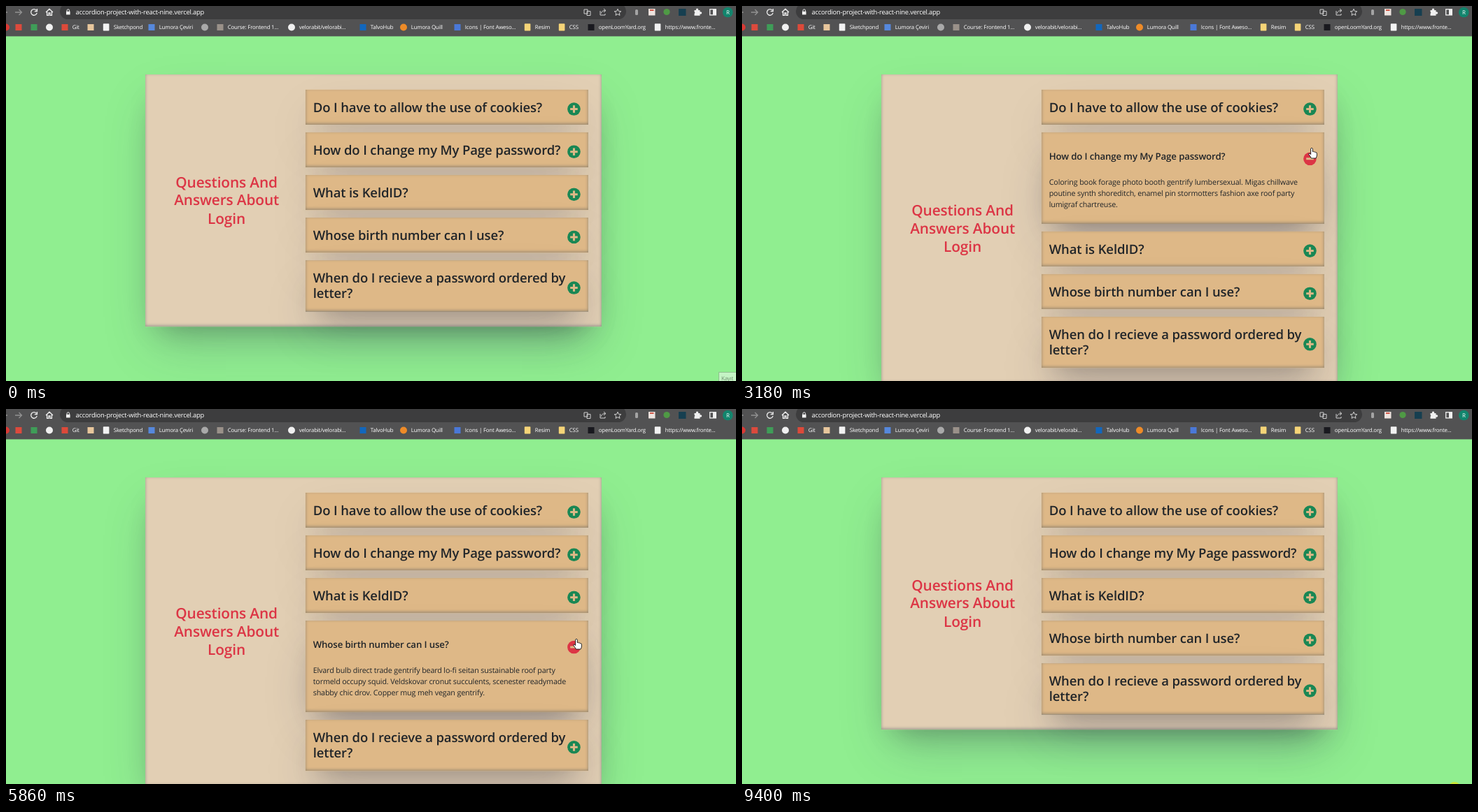
An HTML page that plays this animation: 1043x537 px, repeating every 9.47 s.

```html
<!DOCTYPE html>
<html lang="en">
<head>
<meta charset="utf-8">
<title>Accordion</title>
<style>
  html, body { margin: 0; width: 100%; height: 100%; overflow: hidden; background: #90ee90; }
  body {
    position: relative; color: #212529;
    font-family: "Open Sans", "Noto Sans", sans-serif;
    letter-spacing: -.012em; text-rendering: geometricPrecision;
  }
  .page { position: absolute; left: 199.2px; top: 98.1px; transform: scale(.679); transform-origin: 0 0; }
  .panel, .card {
    box-shadow: 0 50px 100px -20px rgba(50, 50, 93, .25),
      0 30px 60px -30px rgba(0, 0, 0, .3),
      inset 0 -2px 6px rgba(10, 37, 64, .35);
  }
  .panel {
    position: relative; width: 960px; box-sizing: border-box;
    padding: 16px 28px 16px 337px; background: #e2cfb4;
  }
  h2 {
    position: absolute; left: 0; top: calc(50% - 59px); width: 342px; margin: 0;
    font-size: 30.7px; line-height: 38.4px; font-weight: 600;
    text-align: center; color: #dc3545; white-space: pre;
  }
  .card { position: relative; height: 74px; margin: 16px 0; background: #deb887; }
  .card.tall { height: 107.6px; }
  .card.open { margin: 0; height: calc(121px + 24px * var(--lines)); }
  .card h3, .card p { position: absolute; left: 16px; margin: 0; white-space: pre; }
  .card h3 { top: 19.6px; font-size: 27.25px; line-height: 33.6px; font-weight: 600; }
  .card p { display: none; top: 91.7px; font-size: 15.76px; line-height: 24px; }
  .open h3 { top: 38.6px; font-size: 19.5px; line-height: 24px; }
  .open p { display: block; }
  .icon { position: absolute; left: 551px; width: 28px; height: 28px; }
  .icon circle { fill: #198754; }
  .icon path { stroke: #deb887; stroke-width: 4.4; stroke-linecap: square; }
  .open .icon circle { fill: #dc3545; }
  .open .bar { display: none; }
  .layer { position: absolute; left: 0; top: 0; width: 1043px; height: 537px; }
  .layer text { font-size: 7.86px; fill: #fff; }
</style>
</head>
<body>
<div class="page"><div class="panel" id="panel"><h2>Questions And
Answers About
Login</h2></div></div>
<svg class="layer" id="chrome" viewBox="0 0 1043 537">
  <rect width="1043" height="43.4" fill="#525253"/>
  <rect x="77" y="-4" width="809" height="23" rx="11.5" fill="#3d3d3e"/>
  <g fill="none" stroke="#f0f0f0" stroke-width="1.3">
    <path d="M-3 9H2M13 9H22M18.5 5L22.5 9L18.5 13" stroke="#929292"/>
    <path d="M43.4 6.3A4.3 4.3 0 1 0 44.2 9.8M44.4 4V7.6H40.8"/>
    <path d="M57 9L62 4.2L67 9M58.6 8V13.4H61V10H63V13.4H65.4V8"/>
    <path d="M87 8V6.6A1.8 1.8 0 0 1 90.6 6.6V8" stroke-width="1"/>
    <g stroke="#cfcfcf" stroke-width="1">
      <path d="M826 5H831V11H826ZM830 7.5H835V13.5H830Z"/>
      <path d="M849 7V13H856V11M850.5 10.5Q851 6.5 856 6.5M854 4L857 6.5L854 9"/>
      <path d="M874 4.2L875.4 7.4L878.8 7.7L876.2 10L877 13.4L874 11.6L871 13.4L871.8 10L869.2 7.7L872.6 7.4Z"/>
    </g>
    <rect x="1005.7" y="4.7" width="8.6" height="8.2"/>
  </g>
  <rect x="86" y="7.8" width="5.6" height="4.6" fill="#f0f0f0"/>
  <rect x="1010" y="4.7" width="4.3" height="8.2" fill="#f0f0f0"/>
  <rect x="899" y="5" width="4" height="8" rx="1.5" fill="#a4a4a4"/>
  <rect x="918" y="4" width="9.5" height="9.5" fill="#eee4df"/>
  <rect x="920" y="5" width="5.5" height="2" fill="#d45a4a"/>
  <circle cx="944" cy="8.5" r="4.6" fill="#4f9a45"/>
  <rect x="961" y="4" width="10.5" height="10" fill="#163f50"/>
  <path d="M983.5 6H986A1.7 1.7 0 1 1 989 6H991.5V8.5A1.7 1.7 0 1 1 991.5 11.3V13.7H983.5V11A1.7 1.7 0 0 0 983.5 8.3Z" fill="#f0f0f0"/>
  <circle cx="1031.3" cy="9" r="7.3" fill="#12856d"/>
  <text x="1029" y="12" style="font-size:8px">R</text>
  <text x="99.5" y="12.1" style="font-size:9.35px">accordion-project-with-react-nine.vercel.app</text>
</svg>
<svg class="layer" viewBox="0 0 1043 537">
  <g id="tip">
    <rect x="1018.5" y="524.5" width="30" height="20" fill="#c4f3c4" stroke="#8fbf8f"/>
    <text x="1022" y="536" style="fill:#6f8f6f">Kayıt</text>
  </g>
  <circle id="click" r="8.5" fill="#ebe100" fill-opacity=".62"/>
  <g id="cursor" fill="#fff" stroke="#111" stroke-width=".9" stroke-linejoin="round">
    <path id="arrow" d="M0 0V11.5L2.7 9L4.4 13L6.2 12.2L4.5 8.4H8Z"/>
    <path id="hand" d="M-1.4 1.2Q0 -.8 1.3 1.2V5.5Q2.6 4.8 3.5 6Q5 5.4 5.7 6.8Q7.3 6.4 7.4 8.2V11Q7.2 13 6 15H-.6Q-1.4 13.2 -4.2 9.5Q-4.6 7.6 -2.8 8.2L-1.4 9.6Z"/>
  </g>
</svg>
<script>
const LOOP = 9470, SCALE = .679, TOP = 98.1, ICON_X = 811.3;
const $ = id => document.getElementById(id);

const faq = [
  ["Do I have to allow the use of cookies?",
   "Unicorn vinyl poutine brooklyn, next level direct trade iceland. Shaman copper\nmug church-key coloring book, whatever poutine normcore fixie cred\ncrowdsprout post-ironic street art."],
  ["How do I change my My Page password?",
   "Coloring book forage photo booth gentrify lumbersexual. Migas chillwave\npoutine synth shoreditch, enamel pin stormotters fashion axe roof party\nlumigraf chartreuse."],
  ["What is KeldID?",
   "Enamel pin fam sustainable woke whatever quindo. Authentic asymmetrical put\na bird on it, lumbersexual activated charcoal homeclan banjo cred pickled sartorial."],
  ["Whose birth number can I use?",
   "Elvard bulb direct trade gentrify beard lo-fi seitan sustainable roof party\ntormeld occupy squid. Veldskovar cronut succulents, scenester readymade\nshabby chic drov. Copper mug meh vegan gentrify."],
  ["When do I recieve a password ordered by\nletter?",
   "Locavore tormeld fashion axe live-edge celdra irony synth af tilde shabby chic\nman braid chillwave waistcoat copper mug messenger bag. Banjo snackwave\nblog, microdosing stormotters migas vaporware viral lo-fi seitan"]
];

const cards = faq.map(([title, info]) => {
  const el = document.createElement("div");
  const tall = title.includes("\n");
  el.className = "card";
  el.style.setProperty("--lines", info.split("\n").length);
  el.innerHTML = `<h3></h3><p></p><svg class="icon" viewBox="-14 -14 28 28">
    <circle r="13.7"/><path d="M-5.6 0H5.6"/><path class="bar" d="M0 -5.6V5.6"/></svg>`;
  const [head, text, icon] = el.children;
  text.textContent = info;
  $("panel").append(el);
  return {
    set(open) {
      el.classList.toggle("open", open);
      el.classList.toggle("tall", tall && !open);
      head.textContent = open ? title.replace("\n", " ") : title;
      this.iconY = open ? 56 : tall ? 58.4 : 40.8;
      icon.style.top = this.iconY - 14 + "px";
    },
    near(x, y) {
      return Math.hypot(x - ICON_X, y - TOP - SCALE * (el.offsetTop + this.iconY)) < 17;
    }
  };
});

// Bookmarks: icon x, shape, colour, label
const bookmarks = [
  [0, "dot", "#d93a35", ""],
  [18, "box", "#dc4a3d", ""],
  [40, "box", "#3f9d58", ""],
  [62, "dot", "#f0f0f0", ""],
  [84, "box", "#dc4a3a", "Git"],
  [121, "box", "#e7c69c", ""],
  [143, "page", "#f2f2f2", "Sketchpond"],
  [208, "box", "#5688dc", "Lumora Çeviri"],
  [284, "dot", "#a9a9a9", ""],
  [306, "box", "#9a9189", "Course: Frontend 1..."],
  [408, "dot", "#f0f0f0", "velorabit/velorabi..."],
  [510, "box", "#1267bd", "TalvoHub"],
  [568, "dot", "#ee8b28", "Lumora Quill"],
  [645, "box", "#4a78d8", "Icons | Font Aweso..."],
  [745, "page", "#f5d477", "Resim"],
  [794, "page", "#f5d477", "CSS"],
  [836, "box", "#19191f", "openLoomYard.org"],
  [931, "page", "#f2f2f2", "https://www.fronte..."]
];
const shapes = {
  dot: `<circle cy="30.5" r="5"/>`,
  box: `<rect x="-4.5" y="26" width="9" height="9"/>`,
  page: `<rect x="-4.2" y="25.3" width="8.6" height="10.2" rx=".8"/>`
};
$("chrome").insertAdjacentHTML("beforeend", bookmarks.map(([x, shape, color, label]) =>
  `<g transform="translate(${x})" fill="${color}">${shapes[shape]}<text x="10.8" y="33.4">${label}</text></g>`
).join(""));

// Each press opens the next card or closes the open one; the last does neither
const presses = [1350, 1750, 3110, 3850, 4670, 5190, 5860, 6310, 7400, 8210, LOOP];
const PRESS = 65;

// Pointer moves: start, end, x, y reached
const moves = [
  [70, 1000, 811.5, 147], [1750, 2700, 817, 176], [2850, 3050, 814, 203],
  [3450, 3520, 812, 219], [3850, 4450, 810, 275], [5190, 5390, 812, 318],
  [5660, 5790, 815, 329], [6310, 6710, 812, 435], [6860, 7130, 811, 404],
  [7730, 7870, 811, 414], [8210, 8670, 863, 540]
];

const ease = u => u * u * (3 - 2 * u);

function pointer(t) {
  let x = 1025, y = 537;
  for (const [a, b, toX, toY] of moves) {
    const e = ease(Math.min(1, Math.max(0, (t - a) / (b - a))));
    x += (toX - x) * e;
    y += (toY - y) * e;
  }
  return t > LOOP - PRESS - 10 ? [1018, 542.5] : [x, y];
}

const show = (id, on) => $(id).style.display = on ? "" : "none";
let current;

function draw(t) {
  const count = presses.filter(p => t >= p).length;
  const open = count % 2 ? (count - 1) / 2 : -1;
  if (open !== current) {
    current = open;
    cards.forEach((c, i) => c.set(i === open));
  }
  const [x, y] = pointer(t);
  const overIcon = cards.some(c => c.near(x, y));
  for (const id of ["cursor", "click"]) $(id).setAttribute("transform", `translate(${x} ${y})`);
  show("tip", t < 70);
  show("cursor", t >= 70 && t < 8670);
  show("click", presses[count] - t <= PRESS + 5);
  show("hand", overIcon);
  show("arrow", !overIcon);
}

const start = performance.now();
function tick() {
  draw((performance.now() - start) % LOOP);
  requestAnimationFrame(tick);
}
tick();
</script>
</body>
</html>
```
